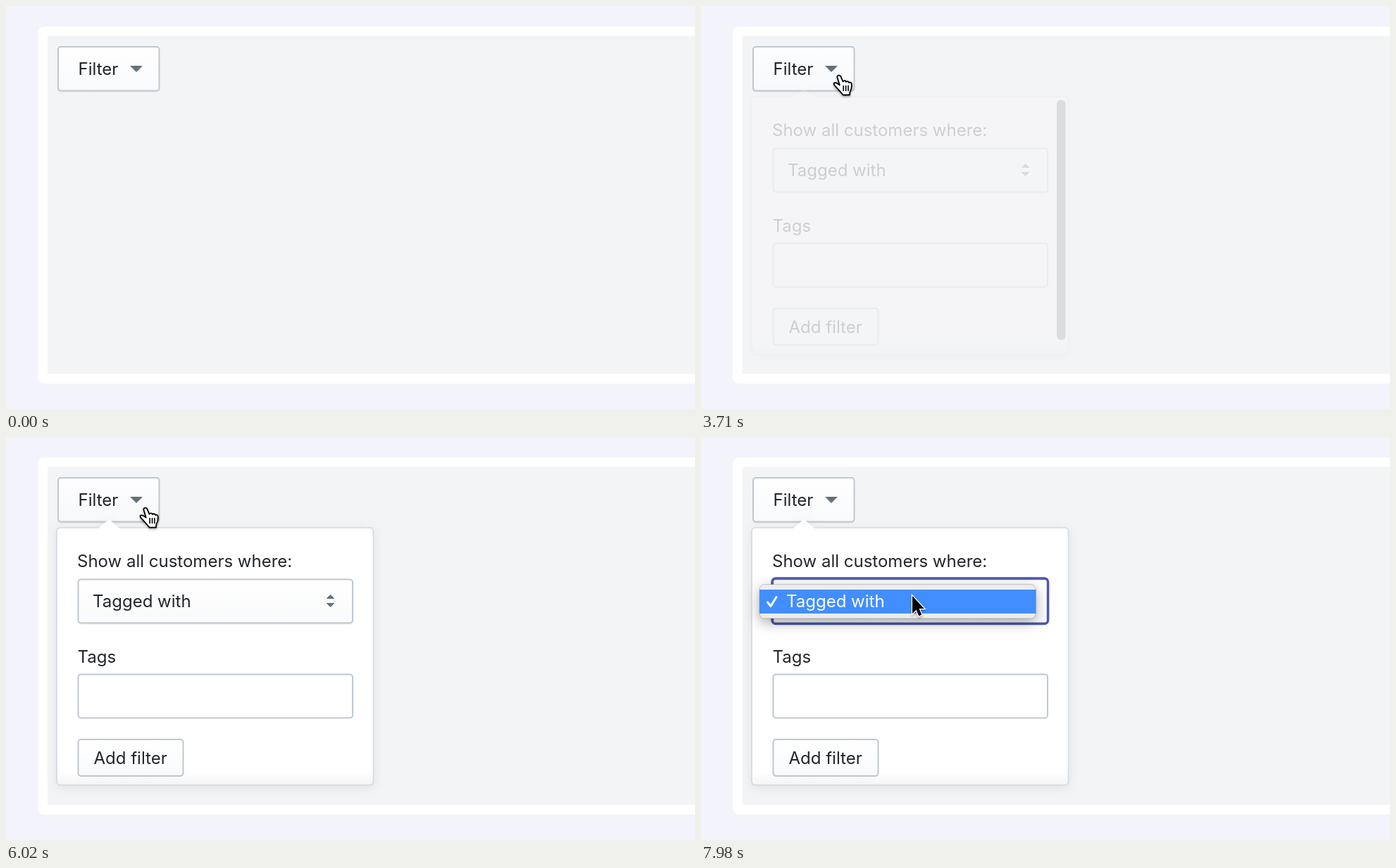
These frames come from a looping animation (978 px wide and 573 px high, 8 s). An HTML page:

```html
<!DOCTYPE html>
<html lang="en">
<head>
<meta charset="utf-8">
<title>Filter popover</title>
<style>
html, body { margin: 0; width: 100%; height: 100%; overflow: hidden; background: #f3f3fc; }
svg { display: block; width: 978px; height: 573px; }
text { font: 400 24px Inter, "Open Sans", sans-serif; fill: #212529; }
.control { stroke: #bfc8cf; stroke-width: 2; }
.icon { fill: #637079; stroke: #637079; stroke-linejoin: round; }
#card { filter: drop-shadow(0 3px 7px rgba(33, 43, 54, .09)); }
#menuBox { filter: drop-shadow(0 6px 9px rgba(0, 0, 0, .32)); }
#cursor { filter: drop-shadow(0 2px 1.5px rgba(0, 0, 0, .3)); }
</style>
</head>
<body>
<svg viewBox="0 0 978 573">
  <defs>
    <linearGradient id="plain" x2="0" y2="1">
      <stop stop-color="#fff"/><stop offset="1" stop-color="#f9fafc"/>
    </linearGradient>
    <linearGradient id="hovered" x2="0" y2="1">
      <stop stop-color="#fafbfd"/><stop offset="1" stop-color="#f5f6f8"/>
    </linearGradient>
    <linearGradient id="opened" x2="0" y2="1">
      <stop stop-color="#fefeff"/><stop offset="1" stop-color="#f6f8fa"/>
    </linearGradient>
    <linearGradient id="edge" x2="0" y2="1">
      <stop stop-color="#212b36" stop-opacity="0"/><stop offset="1" stop-color="#212b36" stop-opacity=".05"/>
    </linearGradient>
  </defs>

  <rect width="978" height="573" fill="#f3f3fc"/>
  <rect x="45" y="29" width="960" height="508" rx="9" fill="#fff"/>
  <rect x="59" y="42.500" width="919" height="480.500" fill="#f3f4f6"/>

  <rect x="73" y="59" width="145" height="64" rx="5" fill="#161d25" opacity=".06"/>
  <rect id="button" class="control" x="74" y="58" width="143.500" height="62.500" rx="4"/>
  <text x="102.500" y="98">Filter</text>
  <path class="icon" stroke-width="1" d="M177 85.500H193L185 93.500Z"/>

  <g id="popover">
    <g id="card">
      <rect x="72" y="129" width="449.500" height="366" rx="5" fill="#fff" stroke="#d3dadf" stroke-width="1.600"/>
      <path d="M131 130L144.500 118Q146 116.800 147.500 118L161 130Z" fill="#fff"/>
    </g>
    <text x="101" y="185">Show all customers where:</text>
    <rect x="102" y="204" width="390.500" height="63" rx="4" fill="#161d25" opacity=".05"/>
    <rect class="control" x="102.500" y="202.500" width="389.500" height="62" rx="4" fill="url(#plain)"/>
    <text x="123" y="242">Tagged with</text>
    <path class="icon" stroke-width="1" d="M455.500 229.500H465.500L460.500 224.500ZM455.500 236.500H465.500L460.500 241.500Z"/>
    <text x="101.500" y="320.500">Tags</text>
    <rect class="control" x="102.500" y="337.500" width="389.500" height="62" rx="4" fill="#fff"/>
    <rect class="control" x="102.500" y="430" width="149" height="52" rx="4" fill="url(#plain)"/>
    <text x="124.500" y="464.500">Add filter</text>
    <rect x="73" y="476" width="448" height="18.500" rx="4" fill="url(#edge)"/>
    <rect id="scrollbar" x="505" y="133.500" width="12.500" height="341.500" rx="6" fill="#000"/>
  </g>

  <rect id="ring" x="101" y="201" width="391.500" height="64.500" rx="5" fill="none" stroke="#4c57ad" stroke-width="3.500"/>
  <g id="menu">
    <rect id="menuBox" x="83" y="209.500" width="392" height="48.500" rx="7" fill="#ebecee" stroke="#000" stroke-opacity=".18"/>
    <rect x="83" y="217" width="392.500" height="34" fill="#428eff"/>
    <path d="M94.500 235L99 240.500L107 227.500" fill="none" stroke="#fff" stroke-width="3" stroke-linecap="round" stroke-linejoin="round"/>
    <text x="121" y="242" style="fill:#fff">Tagged with</text>
  </g>

  <g id="cursor">
    <path id="arrow" d="M1 2V27L6.500 21.700L10.300 30.500L14.300 28.800L10.600 20H17.800Z"
      fill="#000" stroke="#fff" stroke-width="2.600" paint-order="stroke"/>
    <g id="hand" stroke="#000" stroke-width="1.800" stroke-linecap="round" stroke-linejoin="round">
      <path fill="#fff" d="M-2.500 3.500C-3.300 .5 1 -.5 2.300 2L5.500 9.500C7 7.500 9.500 8 10 10C11.500 8.500 13.800 9.200 14.200 11
        C16 10 17.600 11 17.800 13C18.200 17 18 20 15.500 24L15 28.500H5.500C3.500 25.500 -1 21 -3.500 18
        C-6 15.500 -8.500 13 -7 11.500C-5 10 -2.500 12 .8 14.500Z"/>
      <path fill="none" stroke-width="1.600" d="M6.200 15.500V22.500M9.600 15.500V22.500M13 15.500V22.500"/>
    </g>
  </g>
</svg>
<script>
const LOOP = 8000, STEP = 70;
const el = id => document.getElementById(id);
const clamp = v => Math.max(0, Math.min(1, v));
const progress = (t, from, to) => clamp((t - from) / (to - from));

const easeOut = p => p * (2 - p);
const easeIn = p => p * p * (2 - p);
const smooth = p => p * p * (3 - 2 * p);

// Pointer moves: start, end, target x, target y, easing
const start = [322, 16];
const moves = [
  [280, 700, 263, 62, easeOut],
  [770, 1400, 196, 98, smooth],
  [5950, 6580, 279, 187, easeIn],
  [6580, 6790, 290, 208, easeOut],
  [6790, 7070, 297, 224, easeOut],
  [7420, 7490, 299, 224, smooth]
];

function pointerAt(t) {
  let [x, y] = start;
  for (const [from, to, tx, ty, ease] of moves) {
    const p = ease(progress(t, from, to));
    x += (tx - x) * p;
    y += (ty - y) * p;
  }
  return [x, y];
}

const show = (id, visible) => { el(id).style.display = visible ? "" : "none"; };
const fade = (id, opacity) => { el(id).style.opacity = opacity; };

function render(time) {
  const t = Math.floor(time / STEP) * STEP;
  const [x, y] = pointerAt(t);
  const overButton = x > 73 && x < 218 && y > 57 && y < 122;
  const pressed = t >= 3570;

  show("cursor", t >= 280);
  show("hand", overButton);
  show("arrow", !overButton);
  el("cursor").setAttribute("transform", `translate(${x} ${y})`);
  el("button").setAttribute("fill", `url(#${!overButton ? "plain" : pressed ? "opened" : "hovered"})`);

  fade("popover", progress(t, 3640, 4040));
  fade("scrollbar", 0.53 * (1 - progress(t, 4550, 4690)));
  fade("ring", progress(t, 7560, 7770));
  show("menu", t >= 7630);
}

const began = performance.now();
function tick() {
  render((performance.now() - began) % LOOP);
  requestAnimationFrame(tick);
}
tick();
</script>
</body>
</html>
```
